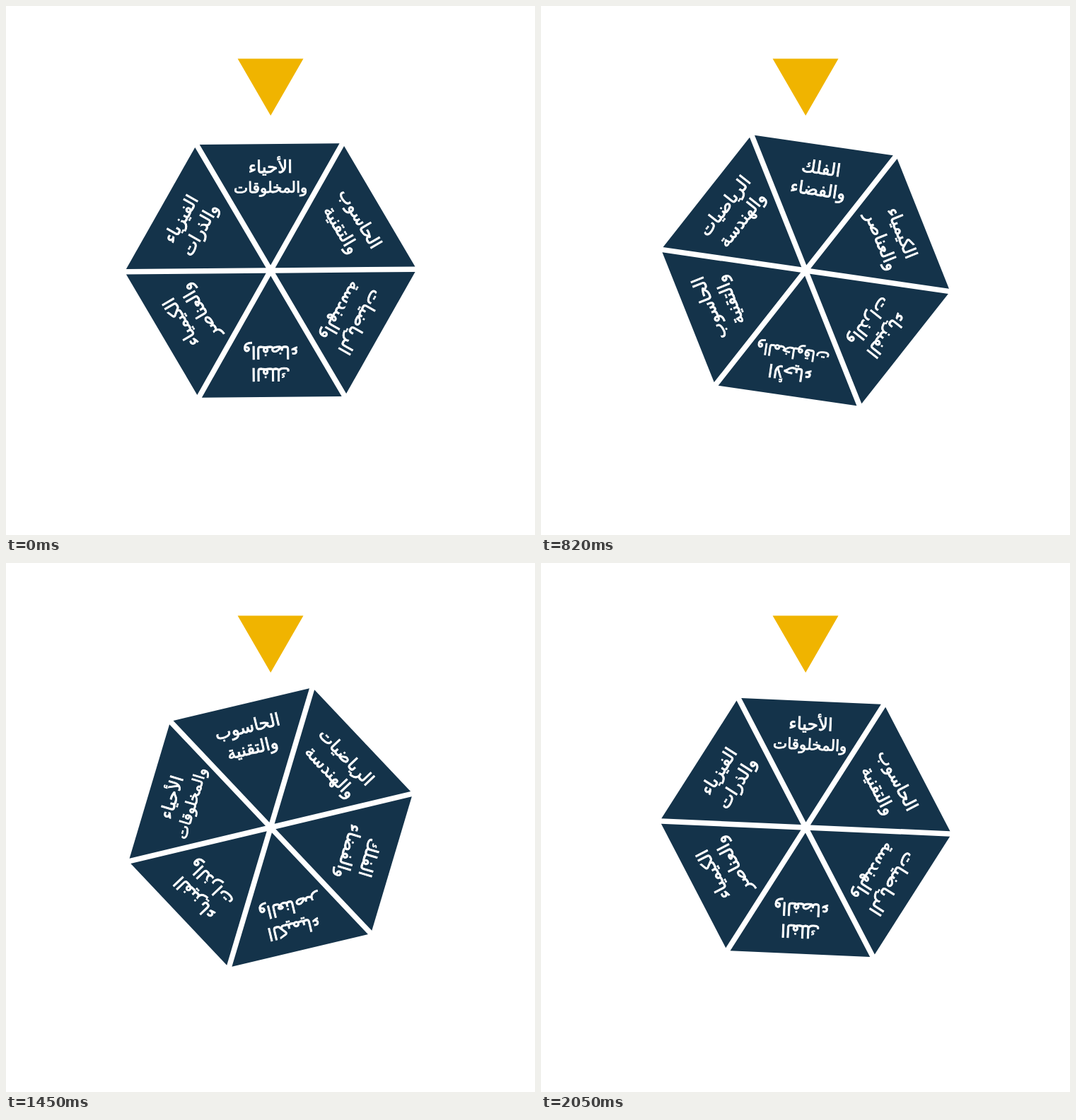
Write an HTML page that moves like this. It is 748 px wide and 748 px high and loops after 2.68 s.

```html
<!DOCTYPE html>
<html lang="ar">
<head>
<meta charset="utf-8">
<title>عجلة العلوم</title>
<style>
  html, body { margin: 0; width: 100%; height: 100%; overflow: hidden; background: #fff; }
  svg { display: block; width: 100vw; height: 100vh; }
  text {
    font-family: "DejaVu Sans", sans-serif;
    font-size: 24.5px;
    text-anchor: middle;
    fill: #fff;
    stroke: #fff;
    stroke-width: .9px;
  }
  .long { font-size: 21.5px; }
</style>
</head>
<body>
<svg viewBox="0 0 748 748">
  <path d="M327.6 74.5H420.5L374.2 155Z" fill="#f0b400"/>
  <g id="wheel"></g>
</svg>
<script>
const wheel = document.getElementById('wheel');

// Two lines per sector, clockwise from the top
const sectors = [
  ['الأحياء', 'والمخلوقات'],
  ['الحاسوب', 'والتقنية'],
  ['الرياضيات', 'والهندسة'],
  ['الفلك', 'والفضاء'],
  ['الكيمياء', 'والعناصر'],
  ['الفيزياء', 'والذرات'],
];

wheel.innerHTML = sectors.map(([first, second], i) => {
  const long = second.length > 9;
  return `
  <g transform="rotate(${i * 60})">
    <path d="M-98.9 -178.8H98.9L0 -7.5Z" fill="#14334a"/>
    <text x="1" y="-138">${first}</text>
    <text x="1" y="${long ? -110 : -107}" class="${long ? 'long' : ''}">${second}</text>
  </g>`;
}).join('');

const LOOP = 2680, START = 370, STEP = 30, LAST = 57;

// Spin curve: [step, degrees turned counterclockwise]
const keys = [[0, .5], [10, 106.2], [21, 227.8], [28, 311.2], [37, 433.4], [48, 592.8], [LAST, 717.5]];

function slope(i) {
  const a = keys[Math.max(i - 1, 0)], b = keys[Math.min(i + 1, keys.length - 1)];
  return (b[1] - a[1]) / (b[0] - a[0]);
}

// Cubic Hermite interpolation between the keys
function turned(n) {
  let i = 0;
  while (i < keys.length - 2 && n > keys[i + 1][0]) i++;
  const [x0, y0] = keys[i], [x1, y1] = keys[i + 1];
  const w = x1 - x0, u = (n - x0) / w, v = 1 - u;
  return y0 * v * v * (1 + 2 * u) + y1 * u * u * (1 + 2 * v)
    + w * u * v * (slope(i) * v - slope(i + 1) * u);
}

function draw() {
  const t = performance.now() % LOOP;
  const n = Math.min(LAST, Math.max(0, Math.floor((t - START) / STEP) + 1));
  wheel.setAttribute('transform', `translate(374.2 374) rotate(${-turned(n)})`);
  requestAnimationFrame(draw);
}
draw();
</script>
</body>
</html>
```
